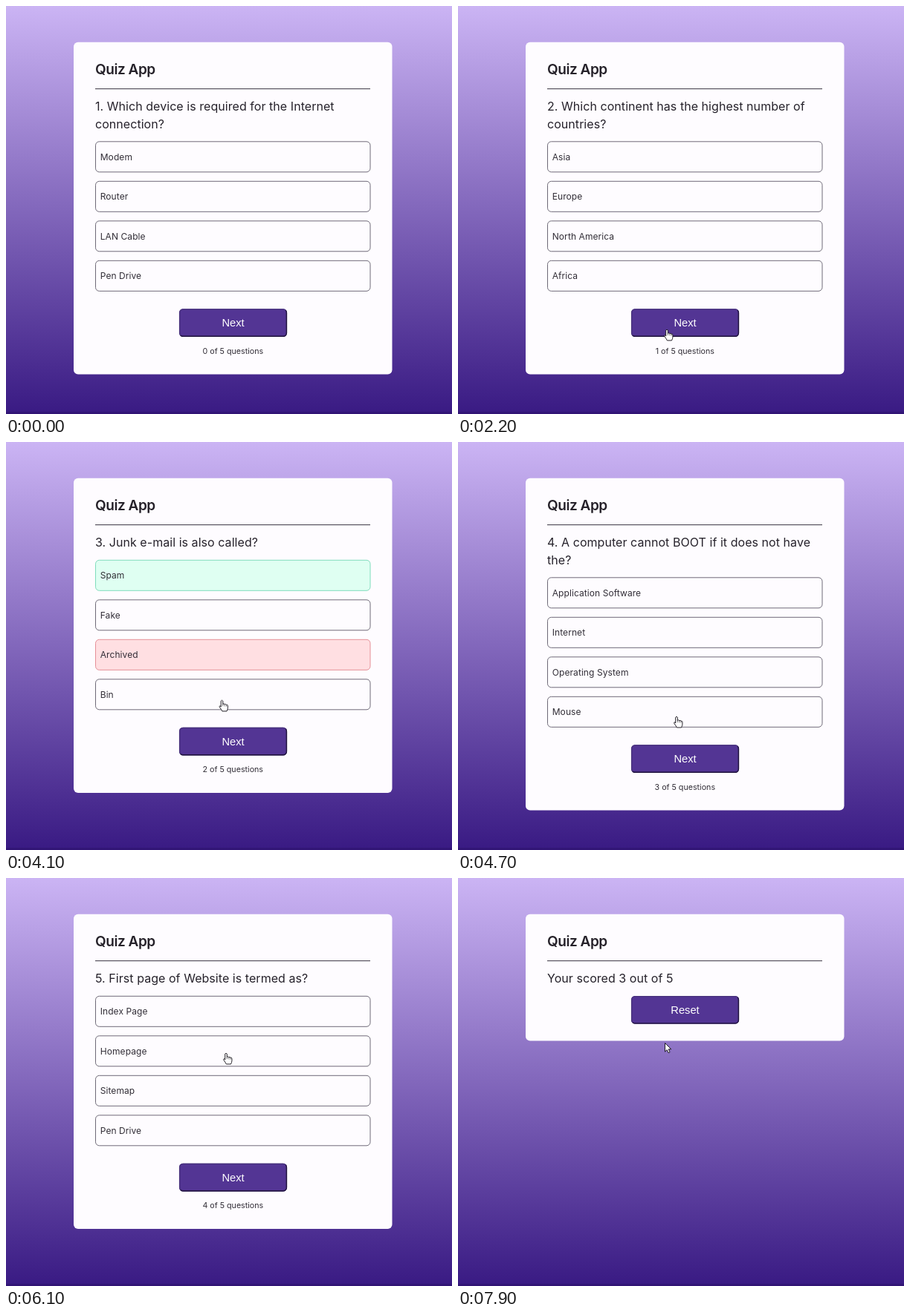
An HTML page with a canvas that plays this animation: 600x550 px, repeating every 8 s.

```html
<!DOCTYPE html>
<html lang="en">
<head>
<meta charset="utf-8">
<title>Quiz App</title>
<style>
  html, body { margin: 0; width: 100%; height: 100%; overflow: hidden; background: #391a83; }
  canvas { display: block; }
</style>
</head>
<body>
<canvas id="stage" width="600" height="550"></canvas>
<script>
const ctx = document.getElementById('stage').getContext('2d');
const LOOP = 8000, STEP = 100;
const LINE = 23.5, PITCH = 53.5;
const SANS = 'Inter, "Open Sans", sans-serif';
const UI = '"Liberation Sans", Arial, sans-serif';

// start: time shown, picked: time answered, pick / right: option indexes
const quiz = [
  { start: 0, picked: 1400, pick: 0, right: 0,
    lines: ['1. Which device is required for the Internet', 'connection?'],
    options: ['Modem', 'Router', 'LAN Cable', 'Pen Drive'] },
  { start: 2100, picked: 2700, pick: 2, right: 3,
    lines: ['2. Which continent has the highest number of', 'countries?'],
    options: ['Asia', 'Europe', 'North America', 'Africa'] },
  { start: 3200, picked: 3800, pick: 2, right: 0,
    lines: ['3. Junk e-mail is also called?'],
    options: ['Spam', 'Fake', 'Archived', 'Bin'] },
  { start: 4500, picked: 5100, pick: 2, right: 2,
    lines: ['4. A computer cannot BOOT if it does not have', 'the?'],
    options: ['Application Software', 'Internet', 'Operating System', 'Mouse'] },
  { start: 5700, picked: 6300, pick: 1, right: 1,
    lines: ['5. First page of Website is termed as?'],
    options: ['Index Page', 'Homepage', 'Sitemap', 'Pen Drive'] }
];
const RESULT = 7100;

// pointer tip: time, x, y
const path = [
  [600, 5, 300], [900, 190, 250], [1200, 292, 206], [1500, 292, 206],
  [1900, 281, 436], [2200, 281, 436], [2600, 300, 312], [2800, 300, 312],
  [3100, 286.5, 419], [3300, 286.5, 419], [3700, 290, 289], [3900, 290, 289],
  [4300, 291, 407], [4500, 291, 407], [4700, 294, 370], [5000, 300, 314],
  [5200, 300, 314], [5500, 300, 427], [5700, 300, 427], [6100, 296, 236],
  [6400, 296, 236], [6800, 289, 406], [7100, 289, 406], [7500, 278.5, 222.5]
];

const looks = {
  plain: { fill: '#fefcff', edge: '#6f6a78' },
  right: { fill: '#dffff2', edge: '#7fdcbc' },
  wrong: { fill: '#ffdfe2', edge: '#e58f98' }
};

function text(str, x, y, font, color, spacing = 0, align = 'left') {
  ctx.font = font;
  ctx.letterSpacing = spacing + 'px';
  ctx.textAlign = align;
  ctx.fillStyle = color;
  ctx.fillText(str, x, y);
}

function box(x, y, w, h, r) {
  ctx.beginPath();
  ctx.roundRect(x, y, w, h, r);
}

function background() {
  const g = ctx.createLinearGradient(0, 0, 0, 550);
  g.addColorStop(0, '#cbb4f4');
  g.addColorStop(1, '#391a83');
  ctx.fillStyle = g;
  ctx.fillRect(0, 0, 600, 550);
  ctx.fillStyle = 'rgba(20, 0, 60, 0.2)';
  ctx.fillRect(0, 547, 600, 3);
}

function card(bottom) {
  ctx.fillStyle = '#fefcff';
  box(91, 48.7, 428.5, bottom - 48.7, 6);
  ctx.fill();
  text('Quiz App', 120, 92, `600 19px ${SANS}`, '#252129', -0.45);
  ctx.fillStyle = '#57525e';
  ctx.fillRect(120, 111, 370, 1.2);
}

function question(str, row) {
  text(str, 120, 141 + row * LINE, `16px ${SANS}`, '#26222b', 0.05);
}

function button(label, y, pressed) {
  const x = 233, w = 145, h = 37.5;
  const edge = color => {
    ctx.strokeStyle = color;
    ctx.lineWidth = 1.4;
    box(x + 0.6, y + 0.6, w - 1.2, h - 1.2, 4.5);
    ctx.stroke();
  };
  ctx.fillStyle = '#533594';
  box(x, y, w, h, 5);
  ctx.fill();
  edge(pressed ? '#21143f' : '#46307a');
  // lower right half of the bevel
  ctx.save();
  ctx.beginPath();
  ctx.moveTo(x - 1, y + h + 1);
  ctx.lineTo(x + h / 2, y + h / 2);
  ctx.lineTo(x + w - h / 2, y + h / 2);
  ctx.lineTo(x + w + 1, y - 1);
  ctx.lineTo(x + w + 1, y + h + 1);
  ctx.clip();
  edge(pressed ? '#46307a' : '#21143f');
  ctx.restore();
  text(label, x + w / 2, y + 24, `14.67px ${UI}`, '#fff', 0, 'center');
}

function option(label, y, look) {
  box(120.5, y + 0.5, 369.5, 41, 5);
  ctx.fillStyle = look.fill;
  ctx.fill();
  ctx.strokeStyle = look.edge;
  ctx.lineWidth = 1;
  ctx.stroke();
  text(label, 126.7, y + 25.3, `12px ${SANS}`, '#322e37', 0.08);
}

function lookOf(q, i, t) {
  if (t < q.picked) return looks.plain;
  if (i === q.right) return looks.right;
  return i === q.pick ? looks.wrong : looks.plain;
}

function drawQuestion(n, t) {
  const q = quiz[n];
  const shift = (q.lines.length - 2) * LINE;
  const end = n + 1 < quiz.length ? quiz[n + 1].start : RESULT;
  card(496.5 + shift);
  q.lines.forEach(question);
  q.options.forEach((label, i) =>
    option(label, 182.3 + shift + i * PITCH, lookOf(q, i, t)));
  button('Next', 408.3 + shift, t >= end - 100);
  text(`${n} of 5 questions`, 305.3, 468.7 + shift, `10.7px ${SANS}`, '#322e37', 0, 'center');
}

function drawResult() {
  card(219.5);
  question('Your scored 3 out of 5', 0);
  button('Reset', 159, false);
}

function pointerAt(t) {
  if (t < path[0][0]) return null;
  const i = path.findIndex(p => p[0] > t);
  if (i < 0) return path[path.length - 1].slice(1);
  const [t0, x0, y0] = path[i - 1], [t1, x1, y1] = path[i];
  const u = (t - t0) / (t1 - t0);
  const k = u * u * (3 - 2 * u);
  return [x0 + (x1 - x0) * k, y0 + (y1 - y0) * k];
}

function overControl(x, y, n) {
  if (n < 0) return x > 233 && x < 378 && y > 159 && y < 196;
  const shift = (quiz[n].lines.length - 2) * LINE;
  if (x > 233 && x < 378 && y > 408 + shift && y < 442 + shift) return true;
  const row = y - 182.5 - shift;
  return x > 120 && x < 490 && row > 0 && row < 4 * PITCH && row % PITCH < 41;
}

const arrow = new Path2D('M0 0V11.6L2.7 9.1L4.5 13.2L6.5 12.3L4.8 8.3H8.3Z');
const hand = new Path2D('M-1.3 1.2Q0 -.9 1.3 1.2V5.3Q2.7 4.2 3.8 5.6Q5.2 4.8 6 6.2' +
  'Q7.8 5.8 7.9 7.6V10.5Q7.7 12.5 6.5 14.9H.4Q-.8 12.5-3 9.6Q-3.8 8-2.8 7.7Q-2 7.6-1.3 9Z');
const knuckles = new Path2D('M1.3 5V8M3.8 5.8V8.3M6 6.5V8.6');

function pointer(x, y, isHand) {
  ctx.save();
  ctx.translate(x, y);
  ctx.lineJoin = 'round';
  ctx.lineWidth = 0.95;
  ctx.strokeStyle = '#18151c';
  ctx.fillStyle = '#fff';
  const shape = isHand ? hand : arrow;
  ctx.fill(shape);
  ctx.stroke(shape);
  if (isHand) {
    ctx.lineWidth = 0.6;
    ctx.stroke(knuckles);
  }
  ctx.restore();
}

function draw(t) {
  const n = t >= RESULT ? -1 : quiz.filter(q => q.start <= t).length - 1;
  background();
  if (n < 0) drawResult();
  else drawQuestion(n, t);
  const tip = pointerAt(t);
  if (tip) pointer(...tip, overControl(...tip, n));
}

let begin;
function tick(now) {
  begin ??= now;
  draw(Math.floor(((now - begin) % LOOP) / STEP) * STEP);
  requestAnimationFrame(tick);
}
draw(0);
requestAnimationFrame(tick);
</script>
</body>
</html>
```
